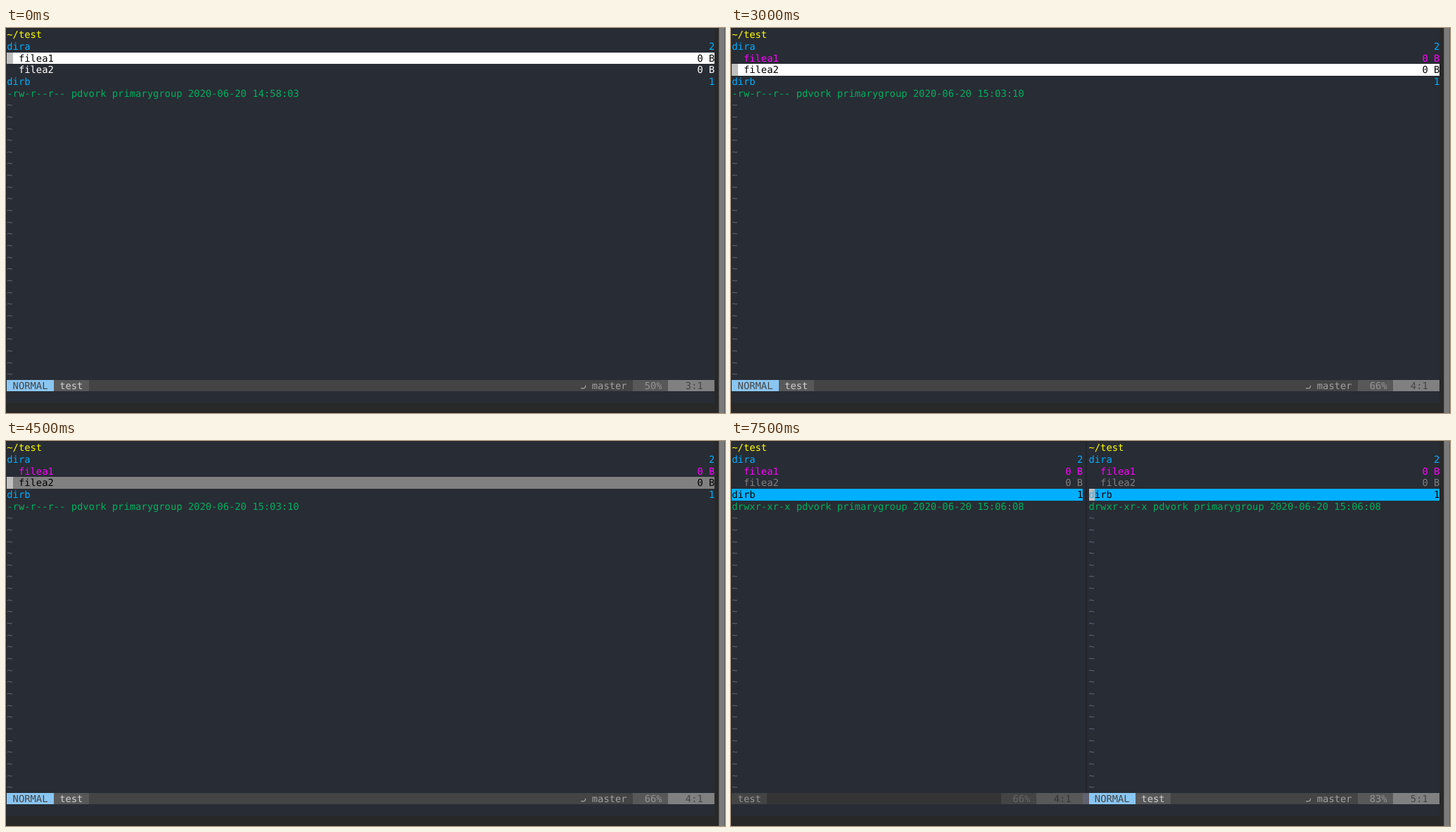
Recreate the animation shown at these times as an HTML page. Size 1022 by 548 pixels, loop 8 s.

```html
<!DOCTYPE html>
<html lang="en">
<head>
<meta charset="utf-8">
<style>
html, body { margin: 0; width: 100%; height: 100%; overflow: hidden; background: #282828; }
svg { display: block; width: 1022px; height: 548px; }
rect { shape-rendering: crispEdges; }
text { font: 13.81px "DejaVu Sans Mono", monospace; white-space: pre; text-rendering: geometricPrecision; }
</style>
</head>
<body>
<svg id="screen" viewBox="0 0 1022 548"></svg>
<script>
const screen = document.getElementById('screen');
const CW = 8.315, RH = 16.65, PAD = 1.3, COLS = 121, LAST = 30;
const BG = '#282c34', BLUE = '#00afff', PINK = '#ff00ff', WHITE = '#ffffff', GRAY = '#808080';

const colX = c => PAD + c * CW;
const rowY = r => PAD + r * RH;
const rect = (x, y, w, h, fill) =>
  `<rect x="${x}" y="${y}" width="${w}" height="${h}" fill="${fill}"/>`;
const cells = (c, r, n, fill) => rect(colX(c), rowY(r), n * CW, RH, fill);
const text = (c, r, str, fill) =>
  `<text x="${colX(c)}" y="${rowY(r) + 13}" fill="${fill}">${str}</text>`;

// Each state: time it begins, cursor row, colours of the two files, details, split view
const fileInfo = '-rw-r--r-- pdvork primarygroup 2020-06-20 ';
const dirInfo = 'drwxr-xr-x pdvork primarygroup 2020-06-20 ';
const states = [
  { at: 0, row: 2, files: [WHITE, WHITE], info: fileInfo + '14:58:03' },
  { at: 1500, row: 2, files: [PINK, WHITE], info: fileInfo + '14:58:03' },
  { at: 3000, row: 3, files: [PINK, WHITE], info: fileInfo + '15:03:10' },
  { at: 4500, row: 3, files: [PINK, GRAY], info: fileInfo + '15:03:10' },
  { at: 6000, row: 3, files: [PINK, GRAY], info: fileInfo + '15:03:10', split: true },
  { at: 7500, row: 4, files: [PINK, GRAY], info: dirInfo + '15:06:08', split: true }
];
const LOOP = 8000;

function pane(s, left, right, active) {
  const entries = [
    ['dira', '2', BLUE],
    ['  filea1', '0 B', s.files[0]],
    ['  filea2', '0 B', s.files[1]],
    ['dirb', '1', BLUE]
  ];
  let out = text(left, 0, '~/test', '#ffff00');
  entries.forEach(([name, size, color], i) => {
    const row = i + 1, on = row === s.row, ink = on ? '#000000' : color;
    if (on) out += cells(left, row, right - left, color);
    if (on && active) {
      out += cells(left, row, 1, '#c0c0c0') + text(left, row, name[0], '#4fa8d8');
      out += text(left + 1, row, name.slice(1), ink);
    } else out += text(left, row, name, ink);
    out += text(right - size.length, row, size, ink);
  });
  out += text(left, 5, s.info, '#00af5f');
  for (let r = 6; r < LAST; r++) out += text(left, r, '~', '#5c6370');
  return out;
}

function ruler(right, row, colors) {
  const [bg1, ink1, bg2, ink2] = colors;
  return cells(right - 14, LAST, 6, bg1) + text(right - 12, LAST, Math.floor(row * 100 / 6) + '%', ink1) +
    cells(right - 8, LAST, 8, bg2) + text(right - 5, LAST, row + ':1', ink2);
}

function activeBar(left, row) {
  const x = colX(98), y = rowY(LAST);
  return cells(left, LAST, COLS - left, '#444444') +
    cells(left, LAST, 8, '#8ac6f2') + text(left + 1, LAST, 'NORMAL', '#444444') +
    cells(left + 8, LAST, 6, '#585858') + text(left + 9, LAST, 'test', '#d0d0d0') +
    `<path d="M${x + 1} ${y + 12}h4q2.5 0 2.5 -4" fill="none" stroke="#a8a8a8" stroke-width="1.2"/>` +
    text(100, LAST, 'master', '#a0a0a0') +
    ruler(COLS, row, ['#585858', '#949494', GRAY, '#444444']);
}

function idleBar(right) {
  return cells(0, LAST, right, '#353535') +
    cells(0, LAST, 6, '#444444') + text(1, LAST, 'test', '#969696') +
    ruler(right, 4, ['#444444', '#666666', '#585858', '#353535']);
}

function draw(s) {
  const left = s.split ? 61 : 0;
  let out = rect(PAD, PAD, COLS * CW, 32 * RH, BG) +
    rect(1013, 0, 9, 548, '#5c5c5c') + rect(1014, 0, 7, 548, '#7c7c7c');
  if (s.split) {
    out += pane(s, 0, 60, false) + idleBar(60) +
      rect(503.6, PAD, 2, LAST * RH, '#20232a') + cells(60, LAST, 1, '#5f6170');
  }
  out += pane(s, left, COLS, true) + activeBar(left, s.row + 1);
  screen.innerHTML = out;
}

let shown;
function tick() {
  const t = performance.now() % LOOP;
  const s = states.findLast(state => state.at <= t);
  if (s !== shown) draw(shown = s);
  requestAnimationFrame(tick);
}
tick();
</script>
</body>
</html>
```
